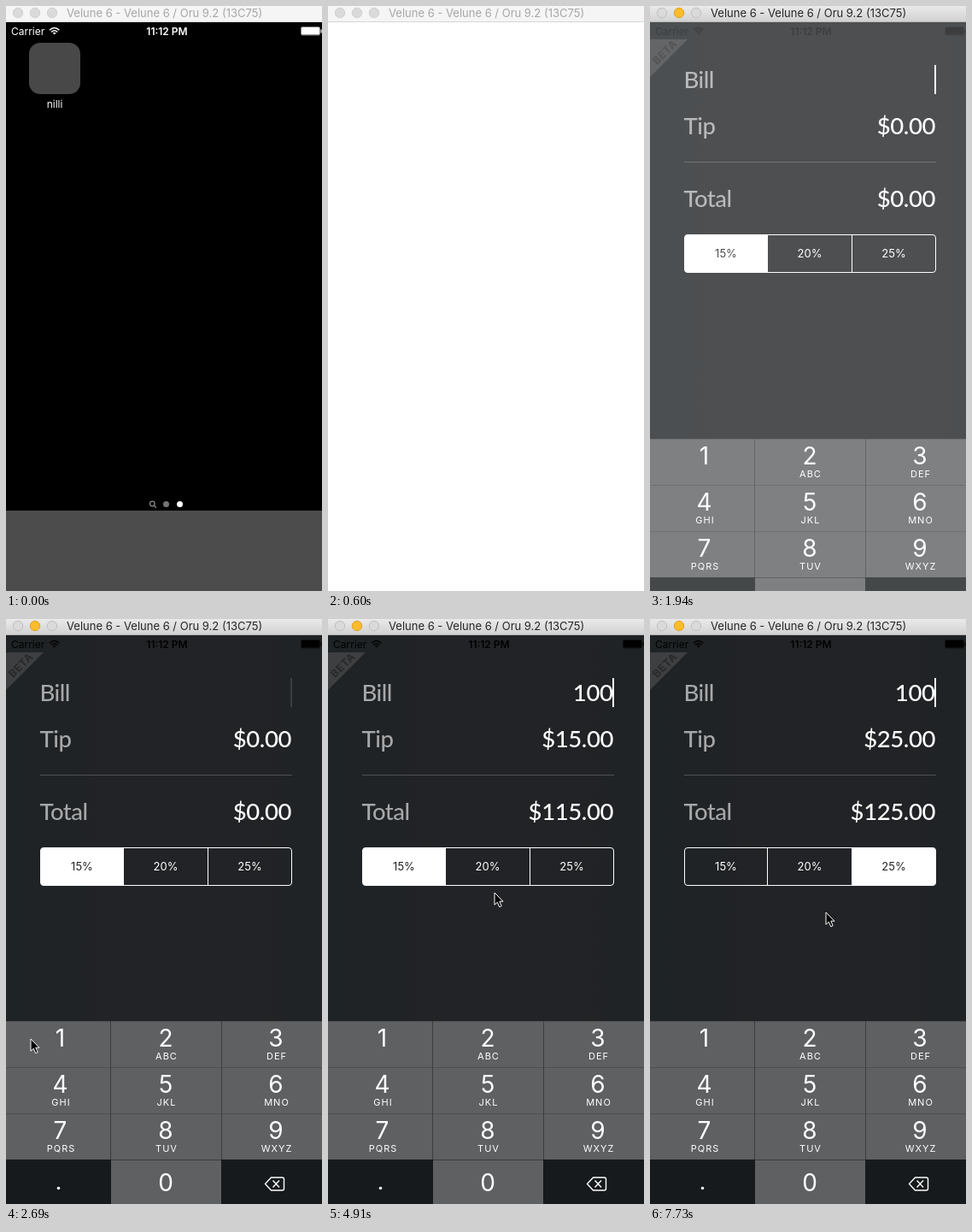
Write an HTML page that moves like this. It is 370x684 px and loops after 8 s.

```html
<!DOCTYPE html>
<html lang="en">
<head>
<meta charset="utf-8">
<title>Tip calculator</title>
<style>
html, body { margin: 0; width: 100%; height: 100%; overflow: hidden; background: #fff; }
svg { display: block; width: 100%; height: 100%; }
text { font-family: Inter, Roboto, sans-serif; }
.mid { text-anchor: middle; }
.big { font-family: Lato, "Open Sans", sans-serif; font-size: 27.5px; font-weight: 500; }
.label { fill: #a6a7a8; letter-spacing: -.5px; }
.sum { fill: #fff; text-anchor: end; letter-spacing: -.4px; }
.digit { font-size: 28px; font-weight: 400; fill: #fff; text-anchor: middle; }
.abc { font-size: 11px; letter-spacing: 1px; fill: #fff; text-anchor: middle; }
.seg { font-size: 13px; text-anchor: middle; }
</style>
</head>
<body>
<svg viewBox="0 0 370 684" preserveAspectRatio="none" xmlns="http://www.w3.org/2000/svg">
  <defs>
    <linearGradient id="bar" x2="0" y2="1">
      <stop stop-color="#eaeaea"/><stop offset="1" stop-color="#d2d2d2"/>
    </linearGradient>
    <linearGradient id="night">
      <stop stop-color="#1e2325"/><stop offset=".4" stop-color="#222326"/>
      <stop offset=".75" stop-color="#222326"/><stop offset="1" stop-color="#1f2325"/>
    </linearGradient>
    <g id="status">
      <text x="6" y="33.500" font-size="12">Carrier</text>
      <text class="mid" x="188.500" y="33.500" font-size="12" font-weight="600">11:12 PM</text>
      <path d="M51 28.300Q56.700 22.700 62.400 28.300M53.200 30.400Q56.700 27 60.200 30.400" fill="none" stroke="currentColor" stroke-width="1.500"/>
      <path d="M56.700 33.500L54.800 31.600Q56.700 30 58.600 31.600Z"/>
      <rect x="345.500" y="24.500" width="22" height="9.500" rx="1.500" fill="none" stroke="currentColor" stroke-opacity=".5"/>
      <rect x="346" y="25" width="21" height="8.500" rx="1"/>
      <rect x="368.500" y="27.500" width="1.200" height="4"/>
    </g>
  </defs>

  <g id="home">
    <rect y="19" width="370" height="665"/>
    <g id="board">
      <rect x="27" y="43" width="60" height="60" rx="13" fill="#484848"/>
      <text class="mid" x="57" y="119" font-size="12" fill="#fff">nilli</text>
      <rect y="590" width="375" height="96" fill="#4c4c4c"/>
      <g fill="none" stroke="#858585" stroke-width="1.300">
        <circle cx="171.300" cy="582" r="2.800"/><path d="M173.300 584L176 586.700"/>
      </g>
      <circle cx="187.500" cy="582.500" r="3.500" fill="#757575"/>
      <circle cx="203.500" cy="582.500" r="3.500" fill="#fff"/>
    </g>
    <use id="homeStatus" href="#status" fill="#fff" color="#fff"/>
    <rect id="launch" fill="#fff"/>
  </g>

  <g id="app">
    <rect y="19" width="370" height="665" fill="url(#night)"/>
    <use id="appStatus" href="#status" fill="#000" color="#000"/>
    <path d="M0 39H44L0 83Z" fill="#3d3f41"/>
    <text class="mid" transform="translate(20.500 57) rotate(-45)" font-size="12.500" font-weight="700" letter-spacing=".5" fill="#27292b">BETA</text>
    <text class="big label" x="39.500" y="96">Bill</text>
    <text class="big label" x="39.500" y="150">Tip</text>
    <text class="big label" x="39.500" y="235">Total</text>
    <text class="big sum" id="bill" x="333.500" y="96"></text>
    <text class="big sum" id="tip" x="334" y="150"></text>
    <text class="big sum" id="total" x="334" y="235"></text>
    <rect id="caret" x="333" y="69" width="2" height="34" fill="#fff"/>
    <rect x="40" y="182" width="295" height="1" fill="#505153"/>
    <g id="segs"></g>
    <g id="pad"></g>
    <rect id="veil" y="19" width="370" height="665" fill="#fff"/>
    <path id="mouse" d="M0 0V14.200L3.300 11.200L5.700 16.700L8.200 15.600L5.800 10.200H10Z" fill="#000" stroke="#fff" stroke-width="1"/>
  </g>

  <g id="title">
    <rect id="titleBg" width="370" height="18"/>
    <rect id="titleEdge" y="18" width="370" height="1"/>
    <circle cx="14" cy="8" r="5.700"/>
    <circle cx="34" cy="8" r="5.700"/>
    <circle cx="54" cy="8" r="5.700"/>
    <text id="titleText" x="71" y="13" font-size="13">Velune 6 - Velune 6 / Oru 9.2 (13C75)</text>
  </g>
</svg>
<script>
const LOOP = 8000, OPEN = 1791, TICK = 148.2;
const $ = id => document.getElementById(id);
const set = (el, attrs) => { for (const k in attrs) el.setAttribute(k, attrs[k]); };
const lerp = (a, b, p) => a + (b - a) * p;
const clamp = v => Math.max(0, Math.min(1, v));
const at = (list, i) => list[Math.min(i, list.length - 1)];

// Keypad
const KEY = '#5e6062', DARK = '#161a1c', PRESSED = '#1c2022';
const colX = [0, 123, 253], colW = [122, 129, 122], mid = [63.5, 187, 316];
const letters = ['', 'ABC', 'DEF', 'GHI', 'JKL', 'MNO', 'PQRS', 'TUV', 'WXYZ'];
function buildPad() {
  let s = `<rect y="470" width="375" height="162" fill="#3b3d3f"/><rect y="632" width="375" height="58" fill="${DARK}"/>`;
  for (let i = 0; i < 11; i++) {
    if (i === 9) continue;
    const c = i % 3, r = Math.floor(i / 3), y = 470 + r * 54, key = (i + 1) % 11;
    s += `<rect id="key${key}" x="${colX[c]}" y="${y + .5}" width="${colW[c]}" height="53.500" fill="${KEY}"/>` +
      `<text class="digit" x="${mid[c]}" y="${y + (r === 3 ? 37 : 30)}">${key}</text>`;
    if (r < 3) s += `<text class="abc" x="${mid[c] + 1}" y="${y + 45}">${letters[i]}</text>`;
  }
  s += '<circle cx="61.500" cy="665.500" r="1.800" fill="#fff"/>' +
    '<path d="M303.500 660.500L310.500 653H323.500Q325.500 653 325.500 655V666Q325.500 668 323.500 668H310.500ZM312.500 656.500L320 664.500M320 656.500L312.500 664.500" fill="none" stroke="#fff" stroke-width="1.400" stroke-linejoin="round"/>';
  $('pad').innerHTML = s;
}

// Tip rate selector
const rates = [15, 20, 25], segX = [40.5, 137.5, 236.5, 334.5];
function segPath(i) {
  const a = segX[i], b = segX[i + 1];
  if (i === 0) return `M${b} 267.500H${a + 3.5}Q${a} 267.500 ${a} 271V308Q${a} 311.500 ${a + 3.5} 311.500H${b}Z`;
  if (i === 2) return `M${a} 267.500H${b - 3.5}Q${b} 267.500 ${b} 271V308Q${b} 311.500 ${b - 3.5} 311.500H${a}Z`;
  return `M${a} 267.500H${b}V311.500H${a}Z`;
}
function buildSegs() {
  $('segs').innerHTML = rates.map((r, i) =>
    `<path id="seg${i}" d="${segPath(i)}" stroke="#fff"/>` +
    `<text class="seg" id="rate${i}" x="${(segX[i] + segX[i + 1]) / 2}" y="294">${r}%</text>`
  ).join('');
}

// Pointer stops: tick, x, y
const stops = [
  [4, -14, 496], [5, 6, 494], [6, 29, 491], [7, 56, 491], [8, 66, 491], [11, 66, 491],
  [13, 140, 590], [14, 184, 646], [19, 184, 646], [20, 190, 470], [21, 195, 320],
  [22, 190, 297], [23, 188, 290], [26, 188, 290], [27, 215, 289], [28, 270, 291],
  [29, 304, 293], [34, 304, 293], [35, 292, 300], [37, 236, 333], [39, 209, 342], [40, 206, 343]
];
function pointer(n) {
  const i = stops.findIndex(s => s[0] >= n);
  if (i < 0) return stops[stops.length - 1].slice(1);
  if (i === 0) return stops[0].slice(1);
  const a = stops[i - 1], b = stops[i], p = (n - a[0]) / (b[0] - a[0]);
  return [lerp(a[1], b[1], p), lerp(a[2], b[2], p)];
}

// The caret blinks once a second and stays lit while typing
function caretLevel(n) {
  if (n < 6) return 1;
  if (n === 6) return .12;
  if (n < 11) return 0;
  if (n < 20) return 1;
  const phase = ((700 + n * 148.25) % 1000) / 1000;
  return clamp(.5 + (Math.abs(phase - .25) - .25) * 6);
}

function drawTitle(active) {
  set($('titleBg'), { fill: active ? 'url(#bar)' : '#f5f5f5' });
  set($('titleEdge'), { fill: active ? '#b4b4b4' : '#d6d6d6' });
  set($('titleText'), { fill: active ? '#262626' : '#a6a6a6' });
  document.querySelectorAll('#title circle').forEach((c, i) => {
    const lit = active && i === 1;
    set(c, { fill: lit ? '#fdbc2e' : '#dadada', stroke: lit ? '#dfa023' : active ? '#c0c0c0' : '#d0d0d0' });
  });
}

function drawHome(t) {
  const p = at([0, .16, .6, .93, 1], Math.floor(t / 150));
  const x = lerp(27, 0, p), y = lerp(43, 19, p), w = lerp(60, 375, p), h = lerp(60, 667, p);
  const s = w / 60;
  set($('board'), { transform: `translate(${x - 27 * s} ${y + (h - w) / 2 - 43 * s}) scale(${s})`, opacity: 1 - p });
  set($('homeStatus'), { opacity: 1 - p });
  set($('launch'), { x, y, width: w, height: h, rx: 13 * (1 - p), opacity: clamp(p * 2) });
}

function drawApp(n) {
  const bill = n < 11 ? 0 : n < 16 ? 1 : n < 19 ? 10 : 100;
  const pick = n < 26 ? 0 : n < 32 ? 1 : 2;
  const tip = bill * rates[pick] / 100;
  $('bill').textContent = bill || '';
  $('tip').textContent = '$' + tip.toFixed(2);
  $('total').textContent = '$' + (bill + tip).toFixed(2);
  rates.forEach((_, i) => {
    set($('seg' + i), { fill: i === pick ? '#fff' : 'none' });
    set($('rate' + i), { fill: i === pick ? '#222326' : '#fff' });
  });
  set($('key1'), { fill: n === 10 ? PRESSED : KEY });
  set($('key0'), { fill: n === 15 || n === 17 || n === 18 ? PRESSED : KEY });
  set($('caret'), { opacity: caretLevel(n) });
  set($('pad'), { transform: `translate(0 ${at([117, 36, 6, 0], n)})` });
  set($('veil'), { opacity: at([.62, .2, 0], n) });
  set($('appStatus'), { opacity: at([0, .6, 1], n) });
  const [x, y] = pointer(n);
  set($('mouse'), { transform: `translate(${x} ${y})` });
}

function draw(t) {
  const open = t >= OPEN;
  drawTitle(open);
  set($('home'), { display: open ? 'none' : 'inline' });
  set($('app'), { display: open ? 'inline' : 'none' });
  if (open) drawApp(Math.floor((t - OPEN) / TICK));
  else drawHome(t);
}

buildPad();
buildSegs();
draw(0);
const start = performance.now();
function loop() {
  draw((performance.now() - start) % LOOP);
  requestAnimationFrame(loop);
}
requestAnimationFrame(loop);
</script>
</body>
</html>
```
